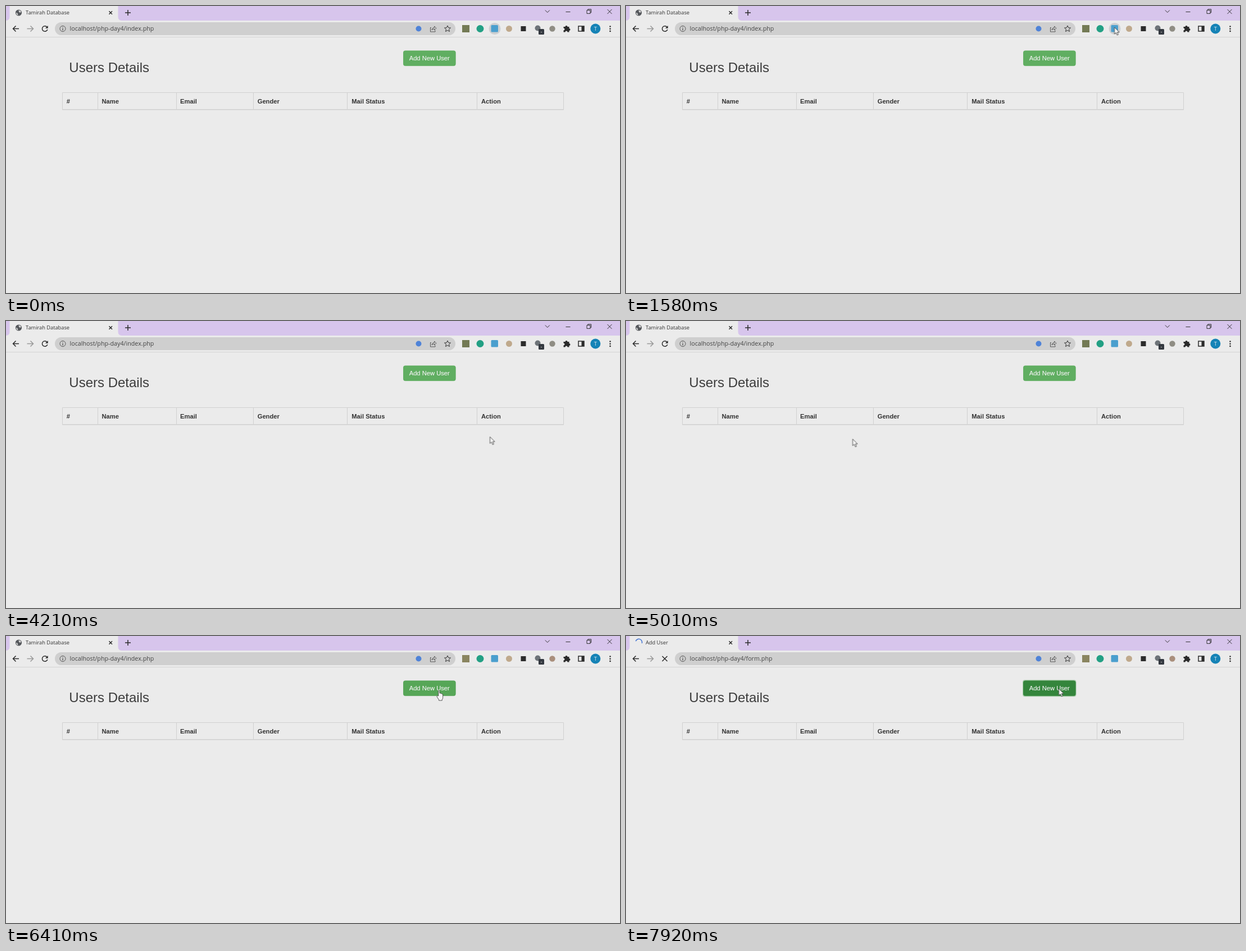
An HTML page for the animation above (8 s loop, 1093 px wide and 512 px high).

```html
<!DOCTYPE html>
<html lang="en">
<head>
<meta charset="utf-8">
<title>Users Details</title>
<style>
html, body { margin: 0; width: 100%; height: 100%; overflow: hidden; background: #ebebeb; }
svg { display: block; width: 1093px; height: 512px; }
text { fill: #333; }
.tab { font: 9.25px "Open Sans", sans-serif; }
.url { font: 10.72px "Open Sans", sans-serif; fill: #444; }
.page { font-family: "Liberation Sans", Arial, sans-serif; }
.head { font-size: 24px; fill: #3c3c3c; }
.cols { font-size: 11.2px; font-weight: bold; }
.label { font-size: 11.2px; fill: #f2f2f2; stroke: #f2f2f2; stroke-width: .15; }
.line { fill: none; stroke: #333; stroke-width: 1; }
.bold { fill: none; stroke: #2b2b2b; stroke-width: 1.5; }
.grid { fill: none; stroke: #d0d0d0; }

.anim { animation: 8s step-end infinite; }
.index { animation-name: index; }
.form { animation-name: form; }
.host { animation-name: host; }
.added { animation-name: added; }
.hover { animation-name: hover; }
.arrow { animation-name: arrow; }
.hand { animation-name: hand; }
.ring { animation-name: ring; }
.button { animation-name: button; }
.spin { animation-name: spin; transform-origin: 22.5px 12px; }
.ext-a { animation-name: ext-a; }
.ext-b { animation-name: ext-b; }

@keyframes index { 0% { visibility: visible } 89.125%, 100% { visibility: hidden } }
@keyframes form { 0% { visibility: hidden } 89.125%, 100% { visibility: visible } }
@keyframes host { 0% { visibility: hidden } 89.125% { visibility: visible } 93.25%, 100% { visibility: hidden } }
@keyframes added { 0% { visibility: hidden } 93.25%, 100% { visibility: visible } }
@keyframes hover { 0% { visibility: visible } 27.125%, 100% { visibility: hidden } }
@keyframes ring { 0% { visibility: hidden } 85.875%, 100% { visibility: visible } }
@keyframes hand { 0% { visibility: hidden } 80.125% { visibility: visible } 89.125%, 100% { visibility: hidden } }
@keyframes button {
  0% { fill: #60ae61; stroke: #57aa58 }
  80.125% { fill: #56a657; stroke: #4f9f51 }
  82.625% { fill: #459a48; stroke: #409043 }
  85.875%, 100% { fill: #34853c; stroke: #34853c }
}
@keyframes spin {
  0% { visibility: hidden; transform: rotate(0deg) }
  93.25% { visibility: visible; transform: rotate(-110deg) }
  95.75% { visibility: visible; transform: rotate(120deg) }
  99%, 100% { visibility: visible; transform: rotate(0deg) }
}
@keyframes ext-a { 0% { fill: #737a55 } 66.75%, 100% { fill: #8a8560 } }
@keyframes ext-b { 0% { fill: #8f8d84 } 66.75%, 100% { fill: #a98f7c } }
@keyframes arrow {
  0% { visibility: hidden; transform: translate(940px, 75px) }
  9.125% { visibility: visible; transform: translate(940px, 75px) }
  10.75% { transform: translate(914px, 77px) }
  12.375% { transform: translate(886px, 55px) }
  14% { transform: translate(865px, 32px) }
  16.5% { transform: translate(846px, 30px) }
  19.75% { visibility: visible; transform: translate(869.5px, 38px) }
  27.125% { visibility: hidden; transform: translate(869.5px, 38px) }
  44.375% { visibility: visible; transform: translate(862px, 225.5px) }
  48.5% { transform: translate(862px, 208px) }
  52.625% { transform: translate(861.5px, 206.5px) }
  57.625% { transform: translate(697.5px, 214px) }
  62.625% { transform: translate(403.5px, 210.5px) }
  66.75% { transform: translate(380px, 201px) }
  68.125% { transform: translate(386px, 202px) }
  69.375% { transform: translate(403.5px, 205px) }
  71% { transform: translate(440px, 205px) }
  72.125% { transform: translate(500px, 200px) }
  73.375% { transform: translate(570px, 191px) }
  74.5% { transform: translate(640px, 180px) }
  75.625% { transform: translate(700px, 168px) }
  76.75% { transform: translate(739.5px, 158.5px) }
  77.625% { visibility: visible; transform: translate(767.5px, 114.5px) }
  80.125% { visibility: hidden; transform: translate(770.5px, 94px) }
  89.125%, 100% { visibility: visible; transform: translate(770.5px, 94px) }
}
</style>
</head>
<body>
<svg viewBox="0 0 1093 512">
  <rect width="1093" height="512" fill="#ebebeb"/>

  <!-- Tab strip -->
  <rect width="1093" height="26" fill="#d7c5ec"/>
  <path d="M0 26Q6.500 26 6.500 19V0H199.500V19Q199.500 26 206 26Z" fill="#ebebeb"/>
  <g class="anim index">
    <circle cx="22.500" cy="12" r="5.600" fill="#55585c"/>
    <path d="M17.800 11.500L20.500 13L21.500 16.500L19 15.500ZM22.500 7.500L26 8.500L27 11L24.500 12L22.800 10Z" fill="#d5d5d5"/>
    <text class="tab" x="35" y="15.300">Tamirah Database</text>
  </g>
  <g class="anim host">
    <circle cx="24" cy="7" r=".7" fill="#8b94a8"/>
    <text class="tab" x="35" y="15.300">localhost/php-day4/form.php</text>
  </g>
  <text class="tab anim added" x="35" y="15.300">Add User</text>
  <path class="anim spin" d="M17.300 9.300A5.800 5.800 0 0 1 28.300 13" fill="none" stroke="#4777d4" stroke-width="1.500"/>
  <path class="bold" d="M183.500 9.200L189 14.700M189 9.200L183.500 14.700M212 12H222M217 7V17"/>
  <path class="line" d="M959.800 7.500L963.800 11.500L967.800 7.500M996.500 10.500H1004.500M1034 7.500H1040V13.500H1034ZM1035.800 7.500V5.800H1041.700V11.700H1040M1070.500 6L1078.500 14M1078.500 6L1070.500 14"/>

  <!-- Toolbar -->
  <path d="M0 55.500H1093" stroke="#d3d3d3"/>
  <rect x="87" y="29" width="713" height="23" rx="11.500" fill="#cfcfcf"/>
  <path class="bold" d="M23 40.500H12.800M17.500 35.500L12.500 40.500L17.500 45.500"/>
  <path class="bold" style="stroke:#999" d="M37.500 40.500H48M43.500 35.500L48.500 40.500L43.500 45.500"/>
  <g class="anim index">
    <path class="bold" d="M73 37.500A4.800 4.800 0 1 0 73.800 42"/>
    <path d="M74.700 35V39.700H70Z" fill="#2b2b2b"/>
  </g>
  <path class="bold anim form" d="M64.500 36L73.500 45M73.500 36L64.500 45"/>
  <g class="line" style="stroke:#555">
    <circle cx="101" cy="40.500" r="5"/>
    <path d="M101 39.800V43.500M101 37.500V38.600" stroke-width="1.300"/>
  </g>
  <text class="url anim index" x="113.500" y="44.300">localhost/php-day4/index.php</text>
  <text class="url anim form" x="113.500" y="44.300">localhost/php-day4/form.php</text>
  <circle cx="734.500" cy="40.500" r="5" fill="#4f83d8"/>
  <path class="line" style="stroke:#555" d="M757 38.500H755.500V46H764V43.500M758 43Q758.500 38.500 762.500 38.500V36L766 39.700L762.500 43V40.800Q759.500 40.800 758 43Z"/>
  <path class="line" d="M786 35L787.600 38.700L791.500 39L788.500 41.600L789.500 45.500L786 43.400L782.500 45.500L783.500 41.600L780.500 39L784.400 38.700Z"/>

  <circle class="anim hover" cx="870" cy="40.500" r="10.500" fill="#cdcfd1"/>
  <rect class="anim ext-a" x="812" y="34" width="13" height="13"/>
  <circle cx="844" cy="40.500" r="6.500" fill="#23a084"/>
  <rect x="863.500" y="34" width="12.500" height="12.500" rx="1.500" fill="#4b9fce"/>
  <circle cx="895.500" cy="40.500" r="5.500" fill="#bfa98c"/>
  <rect x="916.500" y="36" width="9" height="9" fill="#2c2c2c"/>
  <circle cx="946.500" cy="39.500" r="5" fill="#6d7378"/>
  <rect x="948" y="41" width="10" height="10" rx="1.500" fill="#343940"/>
  <rect x="952" y="46" width="2" height="1.200" fill="#aaa"/>
  <circle class="anim ext-b" cx="972.500" cy="40.500" r="5.200"/>
  <path d="M992.500 37H995.500A2 2 0 0 1 999.500 37H1002.500V40A2 2 0 0 1 1002.500 44V46.500H999.500A2 2 0 0 0 995.500 46.500H992.500V43.500A2 2 0 0 0 992.500 39.500Z" fill="#2b2b2b"/>
  <path class="bold" d="M1019 36H1029V45H1019Z"/>
  <rect x="1024.500" y="36" width="4.500" height="9" fill="#2b2b2b"/>
  <circle cx="1049.300" cy="40.500" r="9" fill="#1683b6"/>
  <text x="1049.300" y="44" text-anchor="middle" class="tab" style="fill:#e8f0f4">T</text>
  <g fill="#2b2b2b">
    <circle cx="1075.500" cy="36.500" r="1.300"/><circle cx="1075.500" cy="40.700" r="1.300"/><circle cx="1075.500" cy="44.900" r="1.300"/>
  </g>

  <!-- Page -->
  <g class="page">
    <text class="head" x="112.300" y="118">Users Details</text>
    <rect class="anim ring" x="706" y="78.300" width="95.500" height="30" rx="4" fill="#a9cdab"/>
    <rect class="anim button" x="707.500" y="79.900" width="92.700" height="26.700" rx="3" stroke-width=".8"/>
    <text class="label" x="717.700" y="97">Add New User</text>
    <path class="grid" d="M100.500 185V154.500H992.500V185M163.500 154.500V185M303.500 154.500V185M440.500 154.500V185M607.500 154.500V185M838.500 154.500V185"/>
    <path class="grid" d="M100 184.800H993" stroke-width="1.600"/>
    <g class="cols">
      <text x="107.800" y="173.600">#</text>
      <text x="170.400" y="173.600">Name</text>
      <text x="310.100" y="173.600">Email</text>
      <text x="447.700" y="173.600">Gender</text>
      <text x="615.300" y="173.600">Mail Status</text>
      <text x="846" y="173.600">Action</text>
    </g>
  </g>

  <!-- Pointers -->
  <path class="anim arrow" d="M0 0V12L2.800 9.500L4.800 14L6.900 13.100L4.900 8.800H8.700Z" fill="#f4f4f4" stroke="#444" stroke-width=".9"/>
  <path class="anim hand" d="M769.800 107V98.200Q769.800 97 770.900 97T772 98.200V102Q774 101.600 774.300 102.700Q776 102.400 776.300 103.500Q777.700 103.500 777.700 105V109.500Q777.700 112 776.300 113.500V115H770.500V113.500L767.300 108.800Q766.800 106.500 768.400 106.300Z" fill="#f4f4f4" stroke="#444" stroke-width=".9"/>
</svg>
</body>
</html>
```
